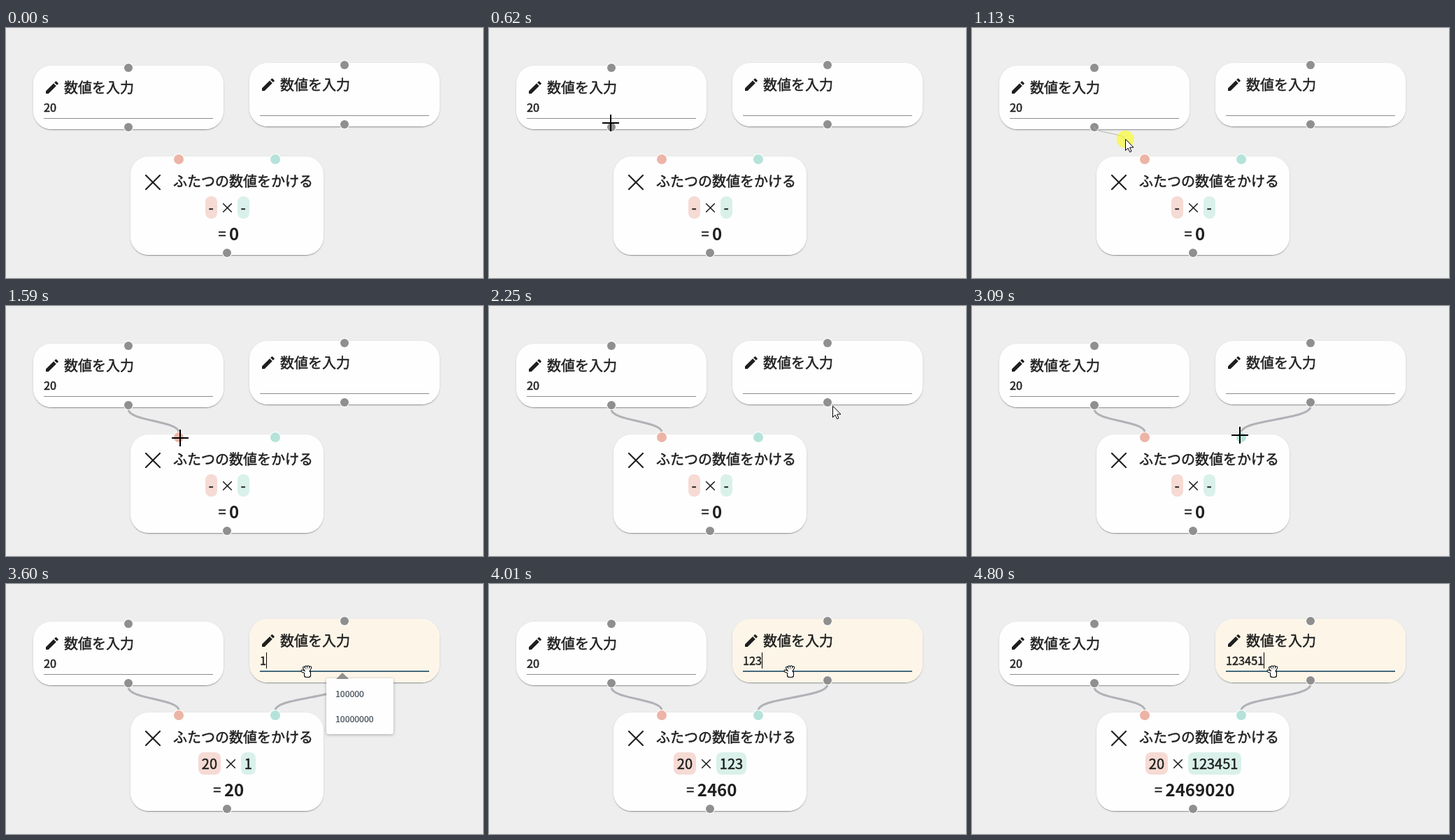
Animation of 682 by 358 pixels, one loop 5060 ms. Source, as an HTML page with a canvas:

```html
<!DOCTYPE html>
<html lang="ja">
<head>
<meta charset="utf-8">
<style>
  html, body { margin: 0; width: 100%; height: 100%; overflow: hidden; background: #eee; }
  canvas { display: block; }
</style>
</head>
<body>
<canvas id="stage" width="682" height="358"></canvas>
<script>
const ctx = document.getElementById('stage').getContext('2d');
ctx.lineJoin = ctx.lineCap = 'round';

const LOOP = 5060;
const FONT = '"Noto Sans CJK JP", "Noto Sans CJK", "Noto Sans JP", sans-serif';
const INK = '#1f1f1f', PAPER = '#fefefe', GRAY = '#8f8f8f', PINK = '#ecb4a6', MINT = '#b5e3da';

const left = { x: 39, y: 54, w: 272, h: 91 };
const right = { x: 348, y: 50, w: 272, h: 91 };
const product = { x: 178, y: 184, w: 276, h: 141 };
const cards = [left, right, product];

const topHandle = (card, part, color) => ({ x: card.x + card.w * part, y: card.y + 3, r: 6, color });
const bottomHandle = card => ({ x: card.x + card.w / 2, y: card.y + card.h - 3, r: 6, color: GRAY });
const leftOut = bottomHandle(left), rightOut = bottomHandle(right);
const pinkIn = { ...topHandle(product, 1 / 4, PINK), y: product.y + 4, r: 7 };
const mintIn = { ...topHandle(product, 3 / 4, MINT), y: product.y + 4, r: 7 };
const handles = [
  topHandle(left, 1 / 2, GRAY), topHandle(right, 1 / 2, GRAY),
  leftOut, rightOut, pinkIn, mintIn, bottomHandle(product),
];

// The pointer is pressed during a drag; the wire settles when it ends.
const drags = [
  { from: leftOut, to: pinkIn, start: 670, end: 1450 },
  { from: rightOut, to: mintIn, start: 2400, end: 2900 },
];
const pointerStart = { time: 110, x: 384, y: 315 };
const moves = [
  { start: 110, end: 620, x: 174, y: 136 },
  { start: 760, end: 1130, x: 219, y: 159 },
  { start: 1130, end: 1330, x: 249, y: 189 },
  { start: 1740, end: 2180, x: 497, y: 147 },
  { start: 2225, end: 2350, x: 480, y: 136 },
  { start: 2430, end: 2850, x: 383, y: 185 },
  { start: 3090, end: 3330, x: 430, y: 125 },
];
const focusTime = 3390;
const typed = '123451';
const keyTimes = [3550, 3780, 4010, 4240, 4520, 4750];

const clamp01 = v => Math.max(0, Math.min(1, v));
const progress = (t, start, end) => clamp01((t - start) / (end - start));
const easeOut = v => 1 - (1 - v) ** 2;

function setFont(size, weight) {
  ctx.font = `${weight} ${size}px ${FONT}`;
}

function widthOf(str, size, weight = 400) {
  setFont(size, weight);
  return ctx.measureText(str).width;
}

function text(str, x, y, size, { weight = 400, color = INK, outline = 0.5 } = {}) {
  setFont(size, weight);
  ctx.fillStyle = ctx.strokeStyle = color;
  ctx.fillText(str, x, y);
  if (outline) {  // thickens regular glyphs to a medium weight
    ctx.lineWidth = outline;
    ctx.strokeText(str, x, y);
  }
}

function rect(x, y, w, h, fill, radius = 0) {
  ctx.beginPath();
  ctx.roundRect(x, y, w, h, radius);
  ctx.fillStyle = fill;
  ctx.fill();
}

function disc(x, y, r, fill) {
  ctx.beginPath();
  ctx.arc(x, y, r, 0, 7);
  ctx.fillStyle = fill;
  ctx.fill();
}

function line(x1, y1, x2, y2, width, color) {
  ctx.beginPath();
  ctx.moveTo(x1, y1);
  ctx.lineTo(x2, y2);
  ctx.lineWidth = width;
  ctx.strokeStyle = color;
  ctx.stroke();
}

function times(x, y, half, width) {
  for (const side of [-1, 1]) line(x - half, y - half * side, x + half, y + half * side, width, INK);
}

function wire(x1, y1, x2, y2, width, color) {
  const mid = (y1 + y2) / 2;
  ctx.beginPath();
  ctx.moveTo(x1, y1);
  ctx.bezierCurveTo(x1, mid, x2, mid, x2, y2);
  ctx.lineWidth = width;
  ctx.strokeStyle = color;
  ctx.stroke();
}

function shadowedRect(x, y, w, h, radius, dy, blur, alpha) {
  ctx.save();
  ctx.shadowColor = `rgba(0,0,0,${alpha})`;
  ctx.shadowOffsetY = dy;
  ctx.shadowBlur = blur;
  rect(x, y, w, h, PAPER, radius);
  ctx.restore();
}

function cardBase({ x, y, w, h }) {
  shadowedRect(x + 1, y + 1, w - 2, h - 2, 25, 2, 1, .2);
  shadowedRect(x, y, w, h, 26, 1, 1, .14);
  shadowedRect(x, y, w, h, 26, 1, 3, .12);
}

function pencil(x, y) {
  const half = 2.65;
  ctx.save();
  ctx.translate(x, y);
  ctx.rotate(-Math.PI / 4);
  ctx.beginPath();
  ctx.moveTo(0, 0);
  ctx.lineTo(half, -half);
  ctx.lineTo(18.3, -half);
  ctx.lineTo(18.3, half);
  ctx.lineTo(half, half);
  ctx.roundRect(19.8, -half, 3.3, 2 * half, [0, 1, 1, 0]);
  ctx.fillStyle = INK;
  ctx.fill();
  ctx.restore();
}

function inputCard(card, value, focus) {
  const x = card.x + 15, y = card.y, lineWidth = 242;
  cardBase(card);
  rect(card.x, y, card.w, card.h, `rgba(253,246,232,${focus})`, 26);
  pencil(x + 3, y + 40);
  text('数値を入力', x + 29, y + 39, 20);
  text(value, x, y + 66, 16.3);
  rect(x, y + 75, lineWidth, 1, '#8c8c8c');
  if (focus > 0) {
    rect(x + lineWidth * (1 - focus) / 2, y + 74, lineWidth * focus, 2, '#456a7e');
    rect(Math.round(x + widthOf(value, 16.3)), y + 48, 1, 23, '#000');
  }
}

function productCard(value) {
  cardBase(product);
  times(210, 221, 10, 2.2);
  text('ふたつの数値をかける', 239, 227, 20);

  const pad = 4.8, gap = 29;
  const factors = value ? ['20', value] : ['-', '-'];
  const widths = factors.map(f => Math.round(widthOf(f, 20) + 2 * pad));
  let x = Math.round(316 - (widths[0] + gap + widths[1]) / 2);
  times(x + widths[0] + gap / 2, 257.5, 5.8, 1.6);
  factors.forEach((factor, i) => {
    rect(x, 241, widths[i], 32, ['#f6dad4', '#d9f1ea'][i], 8);
    text(factor, x + pad, 265, 20);
    x += widths[i] + gap;
  });

  const result = String(20 * value), equalsWidth = 15.6;
  const start = 318.3 - (equalsWidth + widthOf(result, 24, 700)) / 2;
  text('=', start, 302, 20);
  text(result, start + equalsWidth, 304, 24, { weight: 700, outline: 0 });
}

function suggestions(alpha) {
  ctx.save();
  ctx.globalAlpha = alpha;
  shadowedRect(458, 135, 96, 80, 3, 1, 4, .3);
  ctx.beginPath();
  ctx.moveTo(472, 136);
  ctx.lineTo(481, 127);
  ctx.lineTo(490, 136);
  ctx.fill();
  ['100000', '10000000'].forEach((option, i) =>
    text(option, 471, 162 + 36 * i, 12.3, { color: '#3a4650', outline: 0.2 }));
  ctx.restore();
}

function arrowPointer() {
  ctx.beginPath();
  for (const [x, y] of [[.5, .5], [.5, 16.5], [4, 13], [6.7, 18.7], [9, 17.6], [6.6, 12], [11.6, 12]]) ctx.lineTo(x, y);
  ctx.closePath();
  ctx.fillStyle = '#fff';
  ctx.fill();
  ctx.lineWidth = 1;
  ctx.strokeStyle = '#000';
  ctx.stroke();
}

// A thumb and four fingers fan out from the palm; black first, then white inside.
function handPointer() {
  for (const [grow, color] of [[1, '#000'], [0, '#fff']]) {
    for (let i = 0; i < 5; i++) {
      const angle = i ? -.95 + .36 * i : -1.2, length = i ? 9 : 8;
      line(1, 2.5, 1 + length * Math.sin(angle), 2.5 - length * Math.cos(angle), 2 + 2 * grow, color);
    }
    rect(-3 - grow, 0 - grow, 8 + 2 * grow, 8 + 2 * grow, color, 3);
  }
}

function crosshair() {
  rect(-12, -1, 24, 2, '#000');
  rect(-1, -12, 2, 24, '#000');
}

function pointerAt(t) {
  let { x, y } = pointerStart;
  for (const move of moves) {
    const k = easeOut(progress(t, move.start, move.end));
    x += (move.x - x) * k;
    y += (move.y - y) * k;
  }
  return { x, y };
}

function drawPointer({ x, y }, pressed) {
  if (pressed) disc(x, y, 12.5, 'rgba(255,255,0,.55)');
  const onHandle = handles.some(h => Math.hypot(h.x - x, h.y - y) < 8);
  const onCard = cards.some(c => x >= c.x && x <= c.x + c.w && y >= c.y && y <= c.y + c.h);
  ctx.save();
  ctx.translate(Math.round(x), Math.round(y));
  if (onHandle) crosshair();
  else if (onCard) handPointer();
  else arrowPointer();
  ctx.restore();
}

function draw(t) {
  const value = typed.slice(0, keyTimes.filter(time => t >= time).length);
  const pointer = pointerAt(t);
  const drag = drags.find(d => t >= d.start && t < d.end);

  rect(0, 0, 682, 358, '#eee');
  for (const { from, to, end } of drags) {
    if (t >= end) wire(from.x, from.y + 6, to.x, to.y - 7, 3, '#b1b1b7');
  }
  inputCard(left, '20', 0);
  inputCard(right, value, easeOut(progress(t, focusTime, focusTime + 200)));
  productCard(value);
  for (const { x, y, r, color } of handles) {
    disc(x, y, r + 1, '#fff');
    disc(x, y, r, color);
  }
  if (drag) wire(drag.from.x, drag.from.y, pointer.x, pointer.y, 1, '#b4b4ac');

  const popup = value ? 1 - progress(t, keyTimes[1], keyTimes[1] + 190) : 0;
  if (popup > 0) suggestions(popup);
  if (t >= pointerStart.time) drawPointer(pointer, drag);
}

const began = performance.now();
function tick() {
  draw((performance.now() - began) % LOOP);
  requestAnimationFrame(tick);
}
tick();
</script>
</body>
</html>
```
